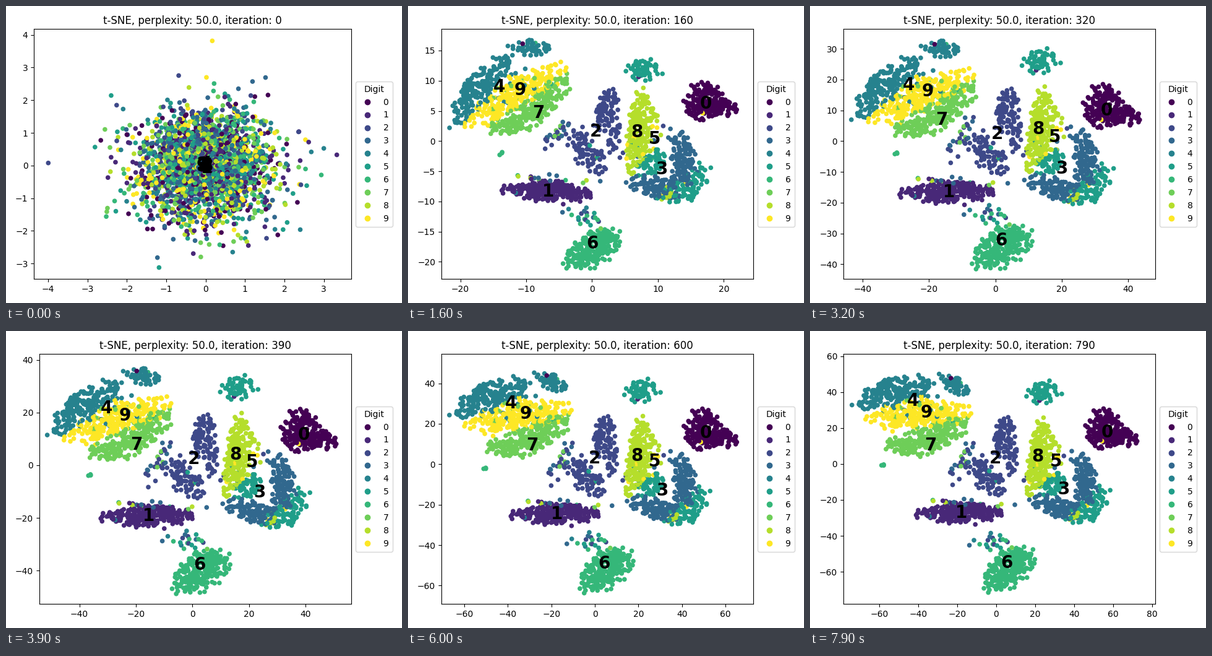
Write a matplotlib script that moves like this. It is 640 px wide and 480 px high and loops after 8000 ms.

```python
import numpy as np
import matplotlib.pyplot as plt
from matplotlib.animation import FuncAnimation
from matplotlib.transforms import Affine2D

W, H, FRAMES, STEP = 640, 480, 80, 10
FORMED, SETTLED, LAST = 80, 250, 790  # iterations between the phases
rng = np.random.default_rng(7)

# Group centres 0-9 in stage pixels (x + yj) at the end of each phase
EARLY = np.array([504+110j, 272+286j, 317+188j, 437+259j, 123+124j,
                  431+229j, 277+399j, 195+131j, 384+230j, 156+121j])
MID = np.array([476+170j, 215+303j, 300+207j, 403+265j, 154+133j,
                391+212j, 303+380j, 215+184j, 366+198j, 188+140j])
LATE = np.array([480+164j, 244+294j, 299+206j, 410+256j, 166+113j,
                 398+211j, 318+375j, 195+185j, 368+203j, 188+132j])
TURN = np.zeros(10)  # rotation of a group while it settles, in degrees
TURN[[4, 6, 7, 9]] = 35, -12, 18, 27

# Size of the axis limits (left, right, bottom, top)
LIM_EARLY = np.array([3.96, 3.92, 4.02, 2.93])
LIM_MID = np.array([35.6, 38.87, 35.45, 29.55])
LIM_LATE = np.array([78.4, 81.6, 78.0, 61.2])
LIM_RATE = np.array([3.1, 2.6, 2.6, 2.5]) / 1000

homes, digits, mids, earlies = [], [], [], []


def mix(a, b, w):
    return a + (b - a) * w


def bent_ellipse(a, b, width, bend, u, v):
    """Map the unit disc onto an ellipse along a-b, bowed sideways by bend."""
    normal = 1j * (b - a) / abs(b - a)
    return (a + b) / 2 + u * (b - a) / 2 + (v * width + bend * (1 - u * u)) * normal


def disc(n):
    """Slightly clumped points in the unit disc."""
    def even(m):
        return np.sqrt(rng.random(m)) * np.exp(2j * np.pi * rng.random(m))
    seeds = even(max(3, n // 9))
    return 1.06 * mix(even(n), rng.choice(seeds, n), 0.4 * rng.random(n))


def blob(home, n, mid, early, shown=None):
    p = disc(n)
    jitter = rng.normal(0, 1.8, n) + 1j * rng.normal(0, 1.8, n)
    homes.append(np.full(n, home))
    digits.append(rng.choice(shown or [home], n))
    mids.append(bent_ellipse(*mid, p.real, p.imag) + jitter)
    earlies.append(bent_ellipse(*early, p.real, p.imag) + jitter)


blob(0, 175, (434+156j, 506+170j, 38, 0), (478+140j, 537+91j, 14, 0))
blob(0, 60, (480+172j, 537+182j, 17, 0), (490+118j, 537+91j, 9, 0))
blob(1, 270, (131+304j, 299+303j, 18, 0), (222+262j, 328+320j, 6, -3))
blob(1, 18, (165+290j, 250+292j, 10, 0), (262+290j, 312+270j, 14, 0))
blob(2, 85, (325+130j, 306+212j, 19, 0), (364+142j, 310+192j, 11, 0))
blob(2, 85, (254+202j, 315+272j, 25, 0), (284+162j, 326+264j, 18, 0))
blob(2, 25, (338+180j, 326+245j, 9, 0), (354+190j, 325+245j, 14, 0))
blob(3, 140, (427+190j, 432+305j, 22, -14), (462+208j, 448+296j, 22, 0))
blob(3, 100, (342+284j, 432+310j, 19, 0), (400+290j, 478+265j, 20, 0))
blob(4, 180, (74+208j, 168+80j, 24, -10), (68+180j, 177+55j, 14, -16))
blob(4, 50, (167+66j, 227+67j, 15, 0), (148+62j, 232+88j, 8, 0))
blob(5, 58, (335+93j, 399+83j, 20, 0), (411+150j, 451+190j, 10, 0))
blob(5, 60, (360+270j, 406+238j, 19, 0), (415+285j, 450+225j, 20, 0))
blob(5, 75, (428+328j, 483+260j, 21, 0), (435+297j, 487+248j, 16, 0))
blob(6, 245, (248+414j, 354+370j, 32, 0), (238+416j, 294+362j, 6, 20))
blob(7, 235, (136+214j, 268+116j, 26, 13), (106+170j, 235+82j, 13, 22))
blob(8, 215, (372+126j, 348+270j, 24, -12), (392+152j, 400+284j, 17, 6))
blob(9, 230, (97+199j, 264+101j, 25, -3), (80+170j, 238+78j, 18, -6))

# Mixed strays between the groups
blob(9, 40, (105+190j, 235+100j, 34, 0), (85+160j, 215+85j, 24, 0), [4, 4, 7, 9])
blob(6, 20, (240+335j, 332+340j, 15, 0), (275+330j, 300+380j, 12, 0), [2, 3, 4, 5, 6])
blob(1, 16, (155+282j, 325+290j, 9, 0), (226+252j, 308+265j, 9, 0), [1, 3, 6, 7, 8])
blob(3, 22, (405+330j, 442+285j, 10, 0), (385+285j, 425+275j, 10, 0), [5, 8, 8, 9])
blob(2, 26, (215+258j, 265+170j, 18, 0), (215+125j, 262+240j, 14, 0), [2, 2, 3, 7])
blob(8, 20, (330+275j, 425+180j, 22, 0), (350+300j, 415+160j, 24, 0), [2, 3, 5, 8, 9])
blob(7, 3, (140+246j, 146+242j, 1, 0), (168+220j, 189+205j, 5, 0), [0, 6])

home, digit, mid, early = map(np.concatenate, (homes, digits, mids, earlies))
order = rng.permutation(len(home))
home, digit, mid, early = (a[order] for a in (home, digit, mid, early))
odd = rng.random(len(digit)) < 0.012
digit[odd] = rng.integers(0, 10, odd.sum())

# Random start with four far points; its limits have the usual 5 % margin
z = np.clip(rng.normal(0, 0.87, (len(digit), 2)), -3, 3)
for d, far in [(1, (3.33, 0.33)), (2, (-3.99, 0.08)), (5, (-1.18, -3.13)), (9, (0.17, 3.83))]:
    z[np.argmax(digit == d)] = far
margin = 0.05 * np.ptp(z, axis=0)
low, high = z.min(axis=0) - margin, z.max(axis=0) + margin
LIM_START = np.array([-low[0], high[0], -low[1], high[1]])
unit = (z - low) / (high - low)
start = 45 + 513 * unit[:, 0] + 1j * (441 - 403 * unit[:, 1])
START = np.array([start[digit == d].mean() for d in range(10)])
lag = rng.uniform(0.65, 1.5, len(digit))


def gather(n):
    return 1 - (1 - n / FORMED) ** 3


def spread(n):
    s = (n - FORMED) / (SETTLED - FORMED)
    return (1 - (1 - s) ** 3) ** 1.4


def relax(n, rate=0.0028):
    """Exponential approach, scaled to run from 0 to 1."""
    return (1 - np.exp(-rate * (n - SETTLED))) / (1 - np.exp(-rate * (LAST - SETTLED)))


def layout(n):
    """Positions of the points and of the group centres."""
    if n <= FORMED:
        w = gather(n)
        return mix(start, early, w ** lag), mix(START, EARLY, w)
    if n <= SETTLED:
        w = spread(n)
        return mix(early, mid, w), mix(EARLY, MID, w)
    w = relax(n)
    centre = mix(MID, LATE, w) + 4 * np.sin(np.pi * w)
    turn = (1 - 0.11 * w) * np.exp(1j * np.radians(TURN) * w)
    return centre[home] + (mid - MID[home]) * turn[home], centre


def limits(n):
    if n <= FORMED:
        s = n / FORMED
        return mix(LIM_START, LIM_EARLY, s) * (1 - 0.4 * np.sin(np.pi * s))
    if n <= SETTLED:
        return LIM_EARLY * (LIM_MID / LIM_EARLY) ** spread(n)
    return mix(LIM_MID, LIM_LATE, relax(n, LIM_RATE))


fig, ax = plt.subplots(figsize=(W / 100, H / 100), dpi=100)
pixels = Affine2D().scale(1 / W, -1 / H).translate(0, 1) + fig.transFigure
dots = ax.scatter(start.real, start.imag, c=digit, s=20, cmap="viridis", transform=pixels)
ax.legend(*dots.legend_elements(num=None), title="Digit",
          loc="center left", bbox_to_anchor=(1, 0.5))
names = [ax.text(0, 0, str(d), transform=pixels, fontsize=20, weight="bold",
                 ha="center", va="center") for d in range(10)]
for artist in (dots, *names):
    artist.set_in_layout(False)


def update(frame):
    n = frame * STEP
    left, right, bottom, top = limits(n)
    ax.set_xlim(-left, right)
    ax.set_ylim(-bottom, top)
    ax.set_title(f"t-SNE, perplexity: 50.0, iteration: {n}")
    points, centres = layout(n)
    dots.set_offsets(np.c_[points.real, points.imag])
    for name, c in zip(names, centres):
        name.set_position((c.real, c.imag))
    fig.tight_layout()
    return [dots, *names]


anim = FuncAnimation(fig, update, frames=FRAMES, interval=100, repeat=True, blit=False)
plt.show()
```
